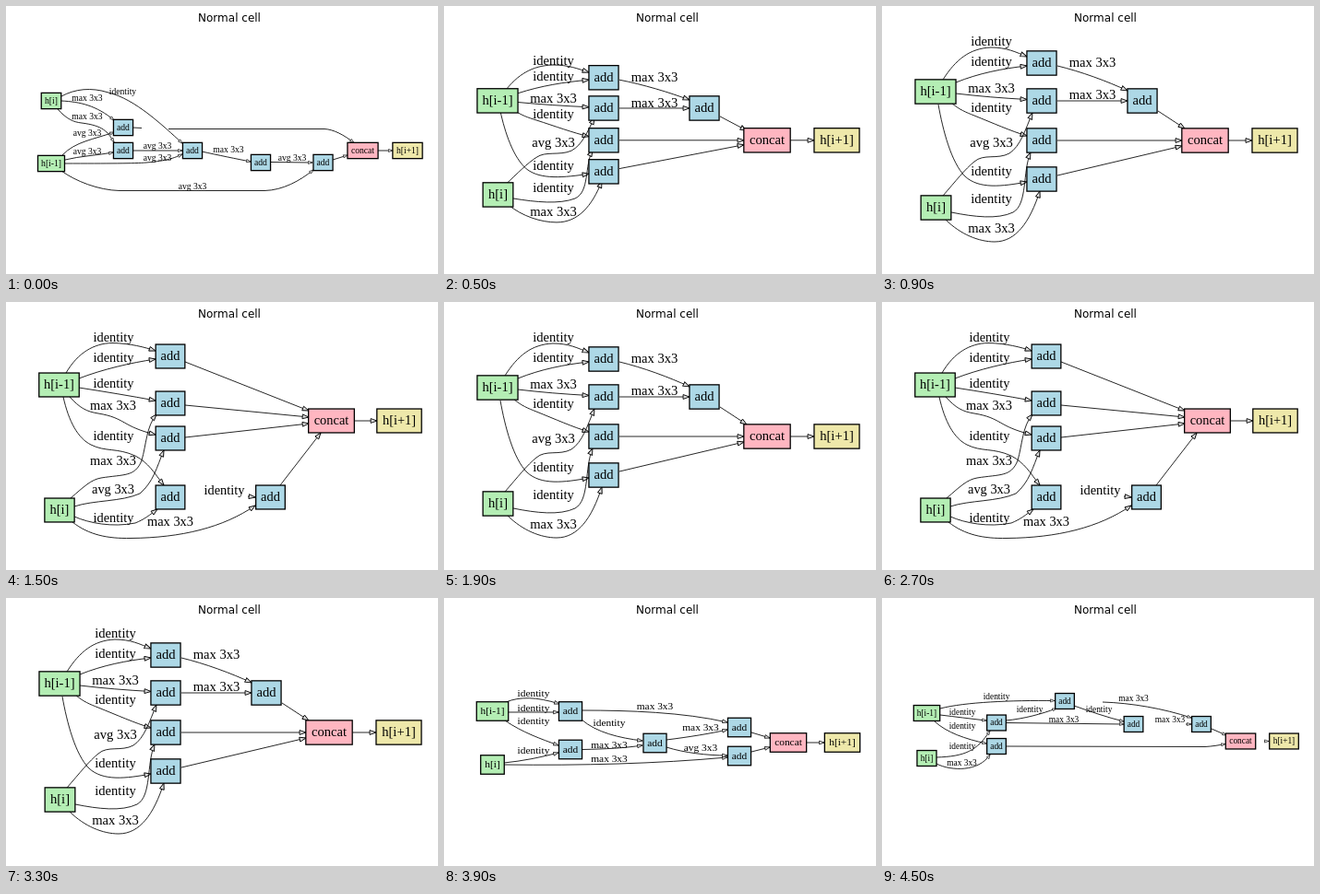
Write an HTML page that moves like this. It is 468 px wide and 291 px high and loops after 5 s.

```html
<!DOCTYPE html>
<html lang="en">
<head>
<meta charset="utf-8">
<title>Normal cell</title>
<style>
html, body { margin: 0; width: 100%; height: 100%; overflow: hidden; background: #fff; }
svg { display: block; width: 100%; height: 100%; }
#title { font: 12px "DejaVu Sans", sans-serif; }
#cell { font-family: "Liberation Serif", serif; }
text { text-anchor: middle; }
#cell rect { stroke: #000; stroke-width: 1.3; }
#cell path { fill: none; stroke: #000; stroke-width: .85; }
</style>
</head>
<body>
<svg viewBox="0 0 468 291">
  <defs>
    <marker id="tip" viewBox="0 0 10 8" refX="9.5" refY="4" orient="auto" markerUnits="userSpaceOnUse">
      <polygon points="1,1 9.5,4 1,7" fill="#ddd" stroke="#000" stroke-width="1.1"/>
    </marker>
  </defs>
  <rect width="468" height="291" fill="#fff"/>
  <text id="title" x="242" y="17">Normal cell</text>
  <g id="cell"></g>
</svg>
<script>
// label, fill, width in ems
const KINDS = {
  prev: ['h[i-1]', '#b4eeb4', 3.02],
  cur: ['h[i]', '#b4eeb4', 2.24],
  add: ['add', '#add8e6', 2.2],
  cat: ['concat', '#ffb6c1', 3.45],
  next: ['h[i+1]', '#eee8aa', 3.36]
};
const OPS = { i: 'identity', m: 'max 3x3', a: 'avg 3x3' };

// size: font size; nodes: kind and centres; ops: label centres; edges: paths
const wide = {
  size: 9.6,
  nodes: { cur: '49 103', prev: '49 171', add: '127 132,127 157,202 157,276 170,343.5 170', cat: '386.5 157', next: '435 157' },
  ops: { i: '126.5 93', m: '88 100,88 120,241 156', a: '88 138,88 158,164 152.5,164 165.5,310 165,202 196.5' },
  edges: [
    'M60 103C80 104 98 108 117 124',
    'M60 98C75 90 92 88 111 94C140 101 170 130 191 149',
    'M56 112C66 123 73 126 82 127C105 130 110 136 117 148',
    'M61 162C75 147 95 145 117 137',
    'M64 167C80 163 100 162 116 159',
    'M64 171C110 171 140 171 152 170C175 168 182 165 191 161',
    'M60 179C75 190 100 200 123 200.5L280 200.5C300 200 318 190 333 178',
    'M137 132L147 132.5M176 133.5L345 133.5C355 134 366 140 377 148.5',
    'M137 157L191 157',
    'M212 158C230 162 250 166 265 169',
    'M287 169.5L332 170',
    'M354 167L370 162',
    'M403 157L419 157'
  ]
};
const four = {
  size: 14.6,
  nodes: { cur: '58.5 219', prev: '58 93', add: '173 62,173 103,173 146,173 188,282 103', cat: '350 146', next: '425.5 146' },
  ops: { i: '118.5 39,118.5 61,118.5 111,118.5 180,118.5 210', m: '118.5 90,228 62,228 96.5,118.5 242', a: '118.5 149' },
  edges: [
    'M66 80C80 58 95 46 118 45C135 45 145 50 157 55',
    'M80 83C105 73 130 68 157 65',
    'M80 95C105 98 130 100 157 101.5',
    'M76 106C85 113 90 115 100 119C120 127 140 136 157 141',
    'M61 107C66 135 75 170 90 185C105 199 130 196 157 191',
    'M66 206C80 190 90 177 100 169C110 160 125 167 138 160C150 152 155 135 163 116',
    'M75 224C100 229 125 232 142 224C158 215 152 180 161 159',
    'M69 232C85 248 105 256 122 256C145 256 160 235 171 201',
    'M190 65C215 71 245 82 266 92',
    'M190 103L266 103',
    'M190 146L325 146',
    'M190 184L325 152',
    'M299 114L328 133',
    'M375 146L401 146'
  ]
};
const deep = {
  size: 14.4,
  nodes: { cur: '58 226', prev: '57.5 90', add: '178 59,178 110,178 148,178 212,286.5 212', cat: '352.5 129', next: '426 129' },
  ops: { i: '116.5 39,116.5 61,116.5 89,116.5 146,116.5 235,236.5 205', m: '116 113,116 173,178 239', a: '116 204' },
  edges: [
    'M65 77C78 55 95 45 115 44.5C135 45 150 49 162 53',
    'M79 83C105 73 135 66 162 62',
    'M79 93C105 97 135 102 162 107',
    'M69 103C80 115 87 119 100 121C130 126 125 135 162 144',
    'M62 103C68 130 78 148 92 155C108 163 120 158 140 167C155 175 160 185 171 199',
    'M70 213C85 200 92 193 103 191C128 187 140 190 147 172C152 155 152 135 163 122',
    'M74 222C95 215 125 217 145 208C160 195 163 180 171 161',
    'M74 233C90 240 115 245 140 240C150 236 156 231 164 225',
    'M72 239C90 253 110 257 135 256.5C190 256 235 245 270 221',
    'M262 211L270 212',
    'M194 65L328 118',
    'M194 112L328 125',
    'M194 147L328 132',
    'M297 199L341 142',
    'M377 129L402 129'
  ]
};
const flat = {
  size: 11.4,
  nodes: { cur: '52.5 181', prev: '52.5 123', add: '137 123,137 164.5,228.5 157.5,320 140.5,320 171.5', cat: '373 157', next: '431.5 157' },
  ops: { i: '97 103.5,97 119.5,97 134,97 166,179 135.5', m: '179 160,179 174.5,228.5 117.5,278 141', a: '278 162.5' },
  edges: [
    'M67 113C82 107 100 107 125 115',
    'M70 124L124 124',
    'M66 133C85 146 105 153 124 160',
    'M65 179C85 177 105 173 124 168',
    'M65 181C150 182 230 180 307 173',
    'M150 122C200 122 260 124 307 135',
    'M149 132C165 146 190 152 215 155',
    'M150 164.5C175 164 195 163 215 160',
    'M241 154C265 151 290 147 307 143',
    'M241 162C260 168 285 171 307 171',
    'M333 146L353 152',
    'M333 167L353 162',
    'M393 157L412 157'
  ]
};
const long = {
  size: 9.4,
  nodes: { cur: '48.5 174', prev: '48.5 125', add: '124 135.5,124 161,198 112,272.5 137,346 137', cat: '388.5 155.5', next: '435.5 155.5' },
  ops: { i: '124 107,87 124.5,87 139.5,87 161.5,160 121,235 121', m: '86.5 179.5,197 132,272.5 109.5,312 132.5' },
  edges: [
    'M63 120C90 113 140 111 187 111.5',
    'M63 127C80 129 95 131 113 133',
    'M57 134C70 146 90 153 113 158',
    'M59 173C90 172 103 166 117 144',
    'M59 180C75 188 105 189 117 170',
    'M134 133C155 131 172 126 189 120',
    'M134 135.5L262 137',
    'M208 117C225 123 245 130 262 134',
    'M239 113C270 114 305 120 335 130',
    'M329 137L335 137',
    'M357 142L373 149',
    'M134 161L350 161.5C358 161 364 160 372 158.5',
    'M414 155.5L419 155.5'
  ]
};

// start time, cell, vertical spread
const SHOW = [
  [0, wide], [500, four, .81], [700, flat], [900, four], [1100, wide], [1300, four],
  [1500, deep], [1700, flat], [1900, four], [2100, deep], [2300, four], [2500, long],
  [2700, deep], [3100, wide], [3300, four], [3900, flat], [4100, flat, 1.33],
  [4300, flat], [4500, long]
];
const LOOP = 5000, MID = 145;
const cell = document.getElementById('cell');
const tip = document.getElementById('tip');

function markup({ size, nodes, ops, edges }, spread = 1) {
  const fitY = y => MID + (y - MID) * spread;
  const spots = list => list.split(',').map(p => p.split(' ').map(Number));
  const label = (s, x, y) => `<text x="${x}" y="${fitY(y) + size * .3}">${s}</text>`;
  let out = '';
  for (const d of edges) {
    const path = d.replace(/([\d.]+) ([\d.]+)/g, (_, x, y) => `${x} ${fitY(+y)}`);
    out += `<path d="${path}" marker-end="url(#tip)"/>`;
  }
  for (const op in ops)
    for (const [x, y] of spots(ops[op])) out += label(OPS[op], x, y);
  for (const kind in nodes) {
    const [name, fill, ems] = KINDS[kind], w = ems * size, h = 1.8 * size;
    for (const [x, y] of spots(nodes[kind]))
      out += `<rect x="${x - w / 2}" y="${fitY(y) - h / 2}" width="${w}" height="${h}" fill="${fill}"/>` + label(name, x, y);
  }
  return out;
}

let shown;
function draw(now) {
  const t = now % LOOP;
  const step = SHOW.filter(s => s[0] <= t).pop();
  if (step !== shown) {
    shown = step;
    const size = step[1].size;
    tip.setAttribute('markerWidth', size * .56);
    tip.setAttribute('markerHeight', size * .45);
    cell.setAttribute('font-size', size);
    cell.innerHTML = markup(step[1], step[2]);
  }
}

const start = performance.now();
function tick() {
  draw(performance.now() - start);
  requestAnimationFrame(tick);
}
tick();
</script>
</body>
</html>
```
